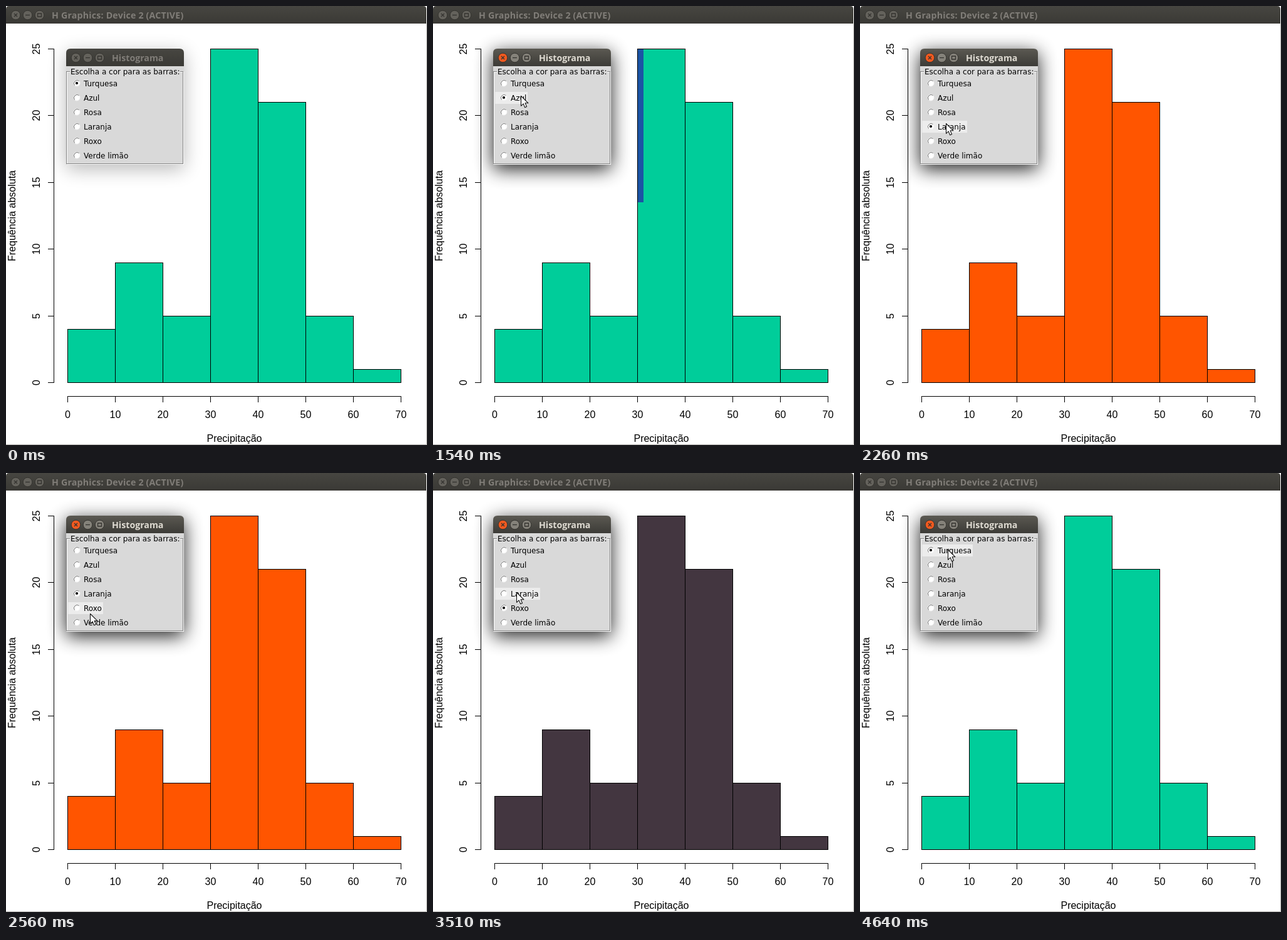
An HTML page that plays this animation: 672x700 px, repeating every 4730 ms.

```html
<!DOCTYPE html>
<html lang="pt">
<head>
<meta charset="utf-8">
<title>Histograma</title>
<style>
html, body { margin: 0; width: 100%; height: 100%; overflow: hidden; background: #fff; }
svg { display: block; width: 672px; height: 700px; }
.plot { font: 16px "Liberation Sans", Arial, sans-serif; text-anchor: middle; }
.form { font: 12px "DejaVu Sans", sans-serif; }
.title { font: bold 14.2px "Open Sans", "Noto Sans", sans-serif; fill: #807d78; }
</style>
</head>
<body>
<svg id="stage" viewBox="0 0 672 700" xmlns="http://www.w3.org/2000/svg">
  <defs>
    <linearGradient id="dim" x2="0" y2="1">
      <stop offset="0" stop-color="#474641"/><stop offset="1" stop-color="#3a3935"/>
    </linearGradient>
    <linearGradient id="lit" x2="0" y2="1">
      <stop offset="0" stop-color="#5b5952"/><stop offset="1" stop-color="#3b3a36"/>
    </linearGradient>
    <filter id="blur" x="-50%" y="-50%" width="200%" height="200%">
      <feGaussianBlur stdDeviation="15"/>
    </filter>
  </defs>
  <rect width="672" height="700" fill="#fff"/>
  <g id="plot" class="plot"></g>
  <path d="M671.5 28V699.5H0" fill="none" stroke="#b4b3b0"/>
  <path d="M0 28V5Q0 0 5 0H666Q671 0 671 5V28Z" fill="url(#dim)"/>
  <g id="mainButtons"></g>
  <text class="title" x="73" y="20" letter-spacing=".2">H Graphics: Device 2 (ACTIVE)</text>

  <rect id="shadow" x="96" y="75" width="188" height="185" filter="url(#blur)"/>
  <path id="bar" d="M96 97V75Q96 68 103 68H277Q284 68 284 75V97Z"/>
  <g id="boxButtons"></g>
  <text id="boxTitle" class="title" x="169" y="88">Histograma</text>
  <rect x="96" y="96" width="188" height="157" fill="#d9d9d9"/>
  <rect x="97.5" y="105.5" width="186" height="147" fill="none" stroke="#fff"/>
  <rect x="96.5" y="104.5" width="186" height="147" fill="none" stroke="#828282"/>
  <rect x="102" y="100" width="176" height="10" fill="#d9d9d9"/>
  <text class="form" x="103" y="109">Escolha a cor para as barras:</text>
  <g id="form" class="form"></g>
  <path id="cursor" d="M.5 .5V16.3L4.2 12.9L6.7 18.8L9.6 17.6L7.1 11.8H12Z"
        fill="#fff" stroke="#111" stroke-width="1.1" stroke-linejoin="round"/>
</svg>
<script>
const LOOP = 4730, START = 820, TICK = 50, FOCUS = 1480;
const options = [
  ["Turquesa", "#00cd9a"], ["Azul", "#1b54a4"], ["Rosa", "#d42bd3"],
  ["Laranja", "#ff5500"], ["Roxo", "#433640"], ["Verde limão", "#c8a152"]
];
// [time of click, time of repaint, option]
const picks = [[0, 0, 0], [FOCUS, 1600, 1], [2150, 2200, 3], [2800, 2850, 5],
  [3220, 3280, 4], [3780, 3840, 2], [4330, 4390, 0]];
// [time, x, y] of the pointer tip
const path = [[820, 660, 148], [1320, 155, 142], [1420, 140, 143], [1640, 140, 143],
  [1800, 139, 164], [1910, 139, 164], [2120, 137, 187], [2300, 137, 187],
  [2700, 133, 234], [2860, 132, 237], [2960, 132, 237], [3070, 132, 213],
  [3320, 132, 213], [3460, 133, 190], [3609, 133, 190], [3610, 136, 168],
  [4080, 136, 168], [4220, 140, 122], [LOOP, 140, 122]];
const counts = [4, 9, 5, 25, 21, 5, 1];

const $ = id => document.getElementById(id);
const set = (node, attrs) => {
  for (const k in attrs) node.setAttribute(k, attrs[k]);
  return node;
};
const add = (parent, tag, attrs, text) => {
  const node = set(document.createElementNS("http://www.w3.org/2000/svg", tag), attrs);
  if (text !== undefined) node.textContent = text;
  parent.appendChild(node);
  return node;
};
const px = v => Math.round(98 + 7.607 * v) + .5;
const py = n => Math.round(600.45 - 21.3 * n) + .5;
const rowY = i => 123 + 23 * i;

function drawPlot() {
  const plot = $("plot");
  const line = d => add(plot, "path", { d, fill: "none", stroke: "#000" });
  const upright = (x, y, text) =>
    add(plot, "text", { transform: `translate(${x} ${y}) rotate(-90)` }, text);
  const bars = add(plot, "g", { stroke: "#000" });
  counts.forEach((n, i) => add(bars, "rect", {
    x: px(i * 10), y: py(n), width: px(i * 10 + 10) - px(i * 10), height: py(0) - py(n)
  }));
  line(`M${px(0)} 622.5H${px(70)}`);
  line(`M76.5 ${py(25)}V${py(0)}`);
  for (let v = 0; v <= 70; v += 10) {
    line(`M${px(v)} 622V632`);
    add(plot, "text", { x: px(v), y: 657 }, v);
  }
  for (let n = 0; n <= 25; n += 5) {
    line(`M67 ${py(n)}H77`);
    upright(54, py(n), n);
  }
  add(plot, "text", { x: 364.5, y: 695 }, "Precipitação");
  upright(15, 334.5, "Frequência absoluta");
  const strip = add(plot, "rect", { x: 327, y: 69, width: 9, height: 244, fill: options[1][1] });
  return { bars, strip };
}

function drawButtons(group, x, y) {
  const glyphs = ["M-2.5 -2.5L2.5 2.5M2.5 -2.5L-2.5 2.5", "M-3.5 0H3.5", "M-3 -2.5H3V2.5H-3Z"];
  return glyphs.map((d, i) => {
    const g = add(group, "g", { transform: `translate(${x + 19 * i} ${y})` });
    const disc = add(g, "circle", { r: 7.3, fill: "#64625c", stroke: "#34332f" });
    add(g, "path", { d, fill: "none", stroke: "#34332f", "stroke-width": 1.3 });
    return disc;
  });
}

function drawRow([name], i) {
  const y = rowY(i), form = $("form");
  const glow = add(form, "rect", { x: 99, y: y - 9, height: 19, fill: "#ececec" });
  add(form, "circle", { cx: 113, cy: y, r: 5, fill: "#fff", stroke: "#f4f4f4" });
  add(form, "path", {
    d: `M109.5 ${y + 3.5}A5 5 0 0 1 116.5 ${y - 3.5}`, fill: "none", stroke: "#777"
  });
  const dot = add(form, "circle", { cx: 113, cy: y, r: 2.1 });
  const label = add(form, "text", { x: 124, y: y + 5 }, name);
  const width = Math.round(label.getComputedTextLength()) + 27;
  set(glow, { width });
  return { glow, dot, width };
}

const { bars, strip } = drawPlot();
drawButtons($("mainButtons"), 15.5, 14.5);
const discs = drawButtons($("boxButtons"), 111.5, 82.5);
const rows = options.map(drawRow);
const show = (node, on) => node.setAttribute("visibility", on ? "visible" : "hidden");
const latest = (t, col) => picks.filter(p => p[col] <= t).pop()[2];

function pointer(t) {
  const i = Math.max(1, path.findIndex(p => p[0] > t));
  const [t0, x0, y0] = path[i - 1], [t1, x1, y1] = path[i];
  const k = (t - t0) / (t1 - t0);
  const e = k * (2 - k);
  return [Math.round(x0 + (x1 - x0) * e), Math.round(y0 + (y1 - y0) * e)];
}

function render(t) {
  const active = t >= FOCUS, moving = t >= START;
  const [x, y] = moving
    ? pointer(START + Math.floor((t - START) / TICK) * TICK) : [-50, -50];
  const chosen = latest(t, 0);

  set(bars, { fill: options[latest(t, 1)][1] });
  show(strip, t >= 1540 && t < 1600);
  set($("shadow"), { opacity: active ? .88 : .28 });
  set($("bar"), { fill: active ? "url(#lit)" : "url(#dim)" });
  $("boxTitle").style.fill = active ? "#dfdbd2" : "#807d78";
  discs.forEach((d, i) => set(d, { fill: !active ? "#64625c" : i ? "#85827a" : "#f0591f" }));
  rows.forEach((r, i) => {
    const dy = y - rowY(i);
    show(r.dot, i === chosen);
    show(r.glow, x >= 99 && x < 99 + r.width && dy >= -9 && dy < 10);
  });
  show($("cursor"), moving);
  set($("cursor"), { transform: `translate(${x} ${y})` });
}

const begin = performance.now();
function frame() {
  render((performance.now() - begin) % LOOP);
  requestAnimationFrame(frame);
}
frame();
</script>
</body>
</html>
```
